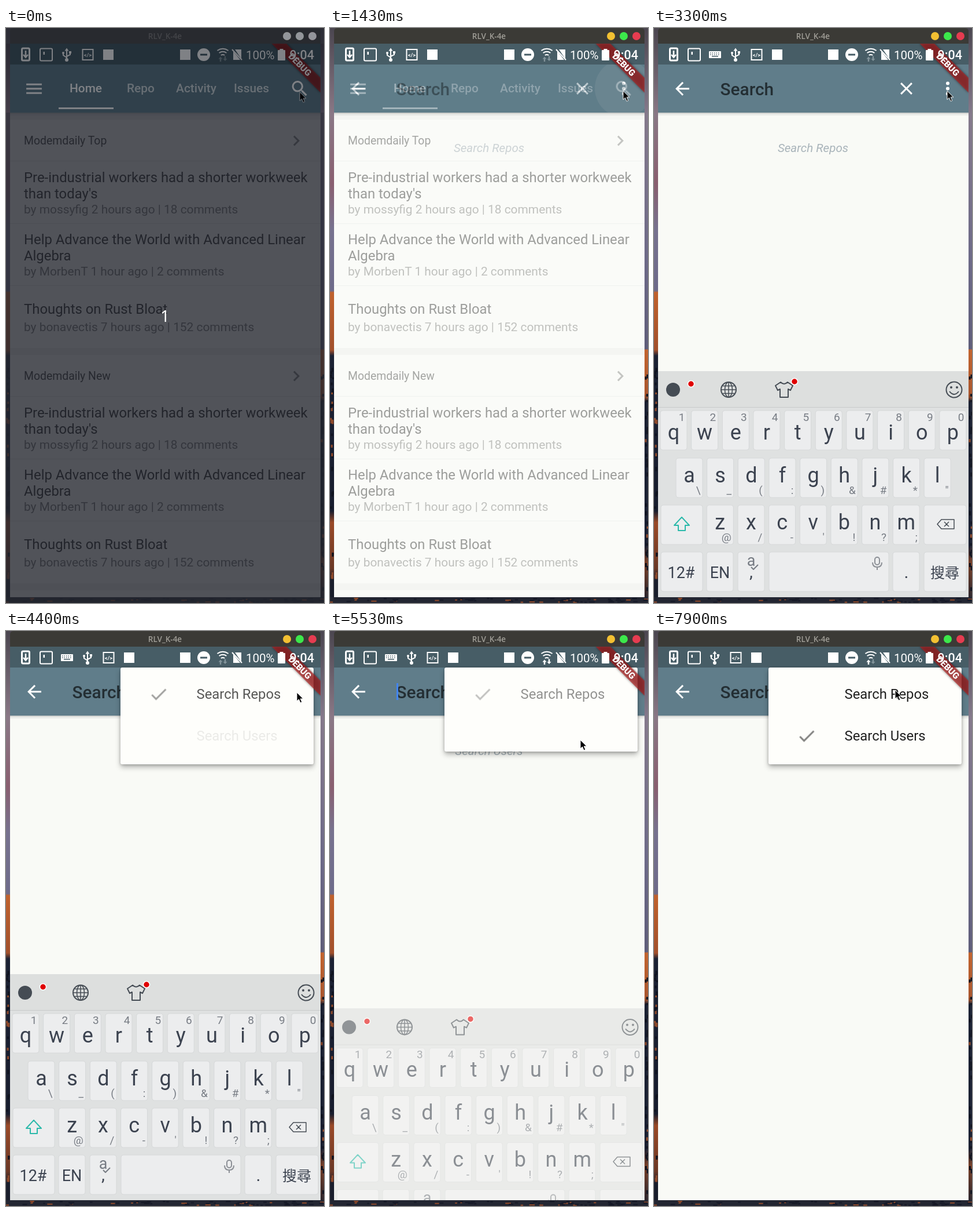
An HTML page for the animation above (8 s loop, 550x992 px).

```html
<!DOCTYPE html>
<html lang="en">
<head>
<meta charset="utf-8">
<title>App search</title>
<style>
html, body { margin: 0; width: 100%; height: 100%; overflow: hidden; background: #14182a; }
#stage { position: relative; width: 550px; height: 992px; overflow: hidden; }
#stage > svg { position: absolute; left: 0; top: 0; }
svg { display: block; font-family: Roboto, sans-serif; }
.title { font-size: 23.87px; fill: rgba(0,0,0,.87); }
.sub { font-size: 20.88px; fill: rgba(0,0,0,.54); }
.head { font-size: 19.4px; fill: rgba(0,0,0,.8); }
.tab { font-size: 20.88px; font-weight: 500; fill: #fff; text-anchor: middle; }
.hint { font-size: 20.6px; font-style: italic; fill: #a9b4ba; text-anchor: middle; }
.key { fill: #ecedee; stroke: #d6d8d9; }
.letter { font-size: 36px; fill: #3c4350; text-anchor: middle; }
.alt { font-size: 19px; fill: #777c84; text-anchor: end; }
.word { font-size: 27px; fill: #3c4350; text-anchor: middle; }
.line { fill: none; stroke: #454c54; stroke-width: 2; stroke-linejoin: round; }
.white { fill: none; stroke: #fff; stroke-width: 2; }
#menu { position: absolute; right: 18px; top: 63px; overflow: hidden; border-radius: 3px;
  background: #fefefb; box-shadow: 0 5px 10px rgba(0,0,0,.28), 0 1px 5px rgba(0,0,0,.2); }
#menu svg { position: absolute; right: 0; top: 0; }
</style>
</head>
<body>
<div id="stage">
  <svg id="base" width="550" height="992"></svg>
  <div id="menu"><svg id="items" width="334" height="167"></svg></div>
  <svg id="top" width="550" height="992"></svg>
</div>
<script>
const $ = id => document.getElementById(id);
const text = (x, y, cls, str, more = '') => `<text x="${x}" y="${y}" class="${cls}" ${more}>${str}</text>`;
const rect = (x, y, w, h, fill, more = '') =>
  `<rect x="${x}" y="${y}" width="${w}" height="${h}" fill="${fill}" ${more}/>`;
const dot = (x, y, r, fill, more = '') => `<circle cx="${x}" cy="${y}" r="${r}" fill="${fill}" ${more}/>`;
const path = (d, cls, more = '') => `<path d="${d}" class="${cls}" ${more}/>`;
const group = (id, inner, more = '') => `<g id="${id}" ${more}>${inner}</g>`;

// Material icons on a 24 unit grid, placed by their centre
const SCALE = 537 / 360;
const shapes = {
  menu: 'M3 18h18v-2H3v2zm0-5h18v-2H3v2zm0-7v2h18V6H3z',
  search: 'M15.5 14h-.79l-.28-.27A6.47 6.47 0 0 0 16 9.5 6.5 6.5 0 1 0 9.5 16c1.61 0 3.09-.59 4.23-1.57l.27.28v.79l5 4.99L20.49 19zm-6 0a4.5 4.5 0 1 1 0-9 4.5 4.5 0 0 1 0 9z',
  back: 'M20 11H7.83l5.59-5.59L12 4l-8 8 8 8 1.41-1.41L7.83 13H20z',
  close: 'M19 6.41L17.59 5 12 10.59 6.41 5 5 6.41 10.59 12 5 17.59 6.41 19 12 13.41 17.59 19 19 17.59 13.41 12z',
  check: 'M9 16.17L4.83 12l-1.42 1.41L9 19 21 7l-1.41-1.41z',
  chevron: 'M10 6L8.59 7.41 13.17 12l-4.58 4.59L10 18l6-6z'
};
const icon = (name, x, y, fill = '#fff') =>
  `<path d="${shapes[name]}" fill="${fill}" transform="translate(${x} ${y}) scale(${SCALE}) translate(-12 -12)"/>`;

const gradient = (id, stops) => `<linearGradient id="${id}" x2="0" y2="1">` +
  stops.map(([at, c]) => `<stop offset="${at}" stop-color="${c}"/>`).join('') + '</linearGradient>';

function wallpaper() {
  let seed = 7;
  const rnd = () => (seed = seed * 16807 % 2147483647) / 2147483647;
  let out = '<defs>' +
    gradient('left', [[0, '#4b4650'], [.15, '#8a7886'], [.27, '#8a5f70'], [.35, '#77728f'], [.457, '#6e6b8a'],
      [.46, '#c0622e'], [.56, '#a2502c'], [.57, '#1c2234'], [.84, '#181d2e'], [.86, '#9a4a28'], [.94, '#6b3826'], [.96, '#1a1e2c']]) +
    gradient('right', [[0, '#4b4650'], [.15, '#857a8c'], [.4, '#6d6a88'], [.558, '#5f5d7a'],
      [.56, '#c2642f'], [.64, '#a8552e'], [.65, '#1b2133'], [.9, '#1b2133'], [.93, '#7a4028'], [1, '#20222e']]) +
    '</defs>' + rect(0, 0, 275, 992, 'url(#left)') + rect(275, 0, 275, 992, 'url(#right)') +
    rect(0, 982, 550, 10, '#232632');
  for (let i = 0; i < 70; i++)
    out += rect(rnd() * 545, 983 + rnd() * 7, 3 + rnd() * 7, 2, rnd() < .3 ? '#8f4a2b' : '#151826');
  for (let i = 0; i < 60; i++)
    out += rect(i % 2 ? 544 + rnd() * 4 : rnd() * 4, 580 + rnd() * 400, 3, 3 + rnd() * 5, rnd() < .25 ? '#8f4a2b' : '#10131f');
  return out;
}

const bar = rect(7, 63, 537, 83, '#607d8a');
const barShadow = rect(7, 146, 537, 2, '#000', 'opacity=".16"') + rect(7, 148, 537, 3, '#000', 'opacity=".05"');

function section(y, name) {
  const t = (dy, s) => text(31, y + dy, 'title', s);
  const s = (dy, str) => text(31, y + dy, 'sub', str);
  return rect(7, y, 537, 394, '#fcfdf9') +
    [71, 179, 286].map(dy => rect(7, y + dy, 537, 1, '#e6e7e4')).join('') +
    text(31, y + 43, 'head', name) + icon('chevron', 502, y + 36.5, 'rgba(0,0,0,.5)') +
    t(108, 'Pre-industrial workers had a shorter workweek') + t(136, "than today's") +
    s(162, 'by mossyfig 2 hours ago | 18 comments') +
    t(215, 'Help Advance the World with Advanced Linear') + t(243, 'Algebra') +
    s(269, 'by MorbenT 1 hour ago | 2 comments') +
    t(335, 'Thoughts on Rust Bloat') + s(365, 'by bonavectis 7 hours ago | 152 comments');
}

function home() {
  return rect(7, 146, 537, 836, '#eeefec') + section(158, 'Modemdaily Top') + section(564, 'Modemdaily New') +
    rect(7, 970, 537, 12, '#fcfdf9') + barShadow + bar +
    dot(508, 104, 50, '#ccc', 'id="ripple" fill-opacity=".25" clip-path="url(#barClip)"') +
    icon('menu', 48.5, 104.8) + text(138, 111, 'tab', 'Home') +
    ['Repo', 'Activity', 'Issues'].map((s, i) => text([233, 329, 424.5][i], 111, 'tab', s, 'opacity=".7"')).join('') +
    rect(91, 137, 95, 3, '#fff') + icon('search', 508, 104.5);
}

function searchPage() {
  return rect(7, 146, 537, 836, '#f9faf6') + barShadow + bar + icon('back', 49, 104.8) +
    text(114.5, 116, '', 'Search', 'font-size="29.83" font-weight="500" fill="rgba(0,0,0,.63)"') +
    rect(115, 90, 3, 29, '#4285f4', 'id="caret"') + icon('close', 436.5, 104.5) +
    [-9, 0, 9].map(d => dot(508, 104.5 + d, 3, '#fff')).join('') +
    text(275, 213.5, 'hint', 'Search Repos', 'id="hintRepos"') +
    text(275, 213.5, 'hint', 'Search Users', 'id="hintUsers"');
}

function keyboard() {
  const key = (x, y, w = 46) => rect(x, y, w, 68, '', 'rx="4" class="key"');
  const row = (chars, alts, cx, y, base, altBase) => [...chars].map((c, i) => {
    const x = cx + i * 53.65;
    return key(x - 23, y) + text(x, base, 'letter', c) + text(x + 19.5, altBase, 'alt', alts[i]);
  }).join('');
  const shirt = 'M219 611l-9 6 4 8 4-2v14h14v-14l4 2 4-8-9-6q-6 6-12 0z';
  return rect(7, 592, 537, 390, '#dfe1e1') + rect(7, 592, 537, 62, '#dddfde') + rect(7, 654, 537, 1, '#c8cacb') +
    dot(33, 624, 12, '#454c54') +
    dot(64, 614, 5.5, '#e00000', 'stroke="#fff" stroke-width="1.5"') +
    path('M116 624h26M129 611v26M118.500 617.500h21M118.500 630.500h21', 'line', 'style="stroke-width:1.5"') +
    dot(129, 624, 13, 'none', 'class="line"') +
    '<ellipse cx="129" cy="624" rx="6.5" ry="13" class="line" style="stroke-width:1.5"/>' +
    path(shirt, 'line') + dot(243, 610, 5.5, '#e00000', 'stroke="#fff" stroke-width="1.5"') +
    dot(519, 624, 13.5, 'none', 'class="line"') + dot(514, 620, 2, '#454c54') + dot(524, 620, 2, '#454c54') +
    path('M511 627q8 10 16 0', 'line') +
    row('qwertyuiop', '1234567890', 34, 660, 710, 678) +
    row('asdfghjkl', '\\_(:)&#*"', 61, 742, 784, 804) +
    row('zxcvbnm', "@/-'!?;", 114.3, 823, 865, 885) +
    key(12, 823, 72) + path('M48 844l13 14h-7v9h-12v-9h-7z', 'line', 'style="stroke:#2bb9aa"') +
    key(467, 823, 73) + path('M490 856l7-8h22v16h-22zM502 852l8 8M510 852l-8 8', 'line', 'style="stroke-width:1.5"') +
    key(12, 904, 72) + text(47, 949, 'word', '12#') +
    key(91, 904) + text(114, 949, 'word', 'EN') +
    key(145, 904) + text(168, 928, 'word', 'a', 'style="fill:#777c84"') +
    path('M168 930l4 4 8-8', 'line', 'style="stroke:#777c84"') + text(168, 948, 'letter', ',', 'style="font-size:30px"') +
    key(199, 904, 207) + rect(382, 913, 8, 13, 'none', 'rx="4" stroke="#8c9096" stroke-width="2"') +
    path('M378 922q0 8 8 8t8-8M386 930v5', 'line', 'style="stroke:#8c9096"') +
    key(413, 904) + text(436.5, 949, 'letter', '.', 'style="font-size:30px"') +
    key(467, 904, 73) + text(503, 949, 'word', '搜尋',
      `style="font-size:25px;font-family:'Noto Sans CJK TC','Noto Sans CJK',sans-serif"`);
}

function statusIcons() {
  const usb = path('M105 36v19M99 43v4l6 4M111 42v4l-6 3', 'white') + dot(105, 55, 3, '#fff') +
    path('M101.500 39.500l3.500-5 3.500 5z', '', 'fill="#fff"') + dot(99, 43, 2, '#fff') + rect(109, 40, 4, 4, '#fff');
  const code = rect(132.5, 37, 18, 18, 'none', 'class="white"') +
    text(141.500, 49.500, '', '&lt;/&gt;', 'font-size="9.500" font-weight="700" fill="#fff" text-anchor="middle"');
  const keys = rect(95, 40, 21, 12, '#fff', 'rx="1"') +
    path('M97 43h17M97 46h17', '', 'stroke="#475d66" stroke-width="1.5" stroke-dasharray="1.5 2"') + rect(100, 48, 11, 1.5, '#475d66');
  const wifi = [4, 8, 12].map(r => path(`M${375 - r * .8} ${51 - r}q${r * .8} ${-r * .55} ${r * 1.6} 0`, 'white')).join('');
  const up = 'M367.500 53.500l3.500-4 3.500 4h-2.300v4.500h-2.400v-4.500z', down = 'M375.500 53l3.500 4 3.500-4h-2.300v-4.500h-2.400v4.500z';
  return rect(27.5, 35, 13, 21, 'none', 'rx="2" stroke="#fff" stroke-width="3"') +
    path('M34 39v10M30 46l4 4.500 4-4.500', 'white', 'style="stroke-width:2.500"') +
    rect(59, 35.500, 21, 21, 'none', 'rx="2" class="white"') + rect(64.500, 41, 2.500, 5, '#fff') +
    group('imeIcon', keys) + group('notes', usb + code + rect(168, 37, 18, 18, '#fff')) +
    rect(301, 37, 18, 18, '#fff') + dot(342, 46, 11, '#fff') + rect(336, 44.500, 12, 3, '#475d66') +
    wifi + path(up + down, '', 'fill="#83949b"') + path(up, '', 'id="up" fill="#fff"') + path(down, '', 'id="down" fill="#fff"') +
    path('M396 37h11v16zM393 40l12 15h-12z', '', 'fill="#fff"') + path('M391 37l17 18', 'white') +
    text(415, 53.500, '', '100%', 'font-size="20.500" fill="#fff"') +
    rect(470, 38, 13, 18, '#fff', 'rx="1"') + rect(473.500, 36, 6, 3, '#fff') +
    text(490.500, 53.500, '', '9:04', 'font-size="21.500" font-weight="500" fill="#fff"');
}

const ribbon = 'M459.600 27H485L544 86V111.400Z';
const banner = `<g clip-path="url(#appClip)">${path(ribbon, '', 'opacity=".5" filter="url(#soft)"')}` +
  path(ribbon, '', 'fill="#b71c1c" fill-opacity=".627"') +
  text(0, 5.500, '', 'DEBUG', 'transform="translate(508.500 63) rotate(45)" font-size="15.200" font-weight="900" fill="#fff" text-anchor="middle"') + '</g>';

const countdown = rect(0, 0, 550, 27, '#23262e', 'opacity=".75"') + rect(0, 146, 550, 846, '#23262e', 'opacity=".79"') +
  rect(0, 27, 550, 119, '#00050c', 'opacity=".5"') +
  [486, 508, 530].map(x => dot(x, 14, 7, '#93959a')).join('') +
  text(275, 507, '', '1', `font-size="28" fill="#fff" text-anchor="middle" style="font-family:'Noto Sans',sans-serif"`);

$('base').innerHTML = `<defs><clipPath id="appClip">${rect(7, 27, 537, 955)}</clipPath>` +
  `<clipPath id="barClip">${rect(7, 63, 537, 83)}</clipPath></defs>` + wallpaper() +
  path('M7 27V6q0-6 6-6H538q6 0 6 6V27Z', '', 'fill="#3b3a36"') +
  text(275, 19, '', 'RLV_K-4e', `font-size="13.500" font-weight="600" fill="#a09e97" text-anchor="middle" style="font-family:'Open Sans',sans-serif"`) +
  ['#f3c032', '#3ce84b', '#e63c50'].map((c, i) => dot(486 + i * 22, 14, 7, c)).join('') +
  rect(7, 27, 537, 36, '#475d66') + home() + group('search', searchPage());

$('items').innerHTML =
  group('item0', text(131.500, 54, 'title', 'Search Repos') + group('check0', icon('check', 66, 46, 'rgba(0,0,0,.5)'))) +
  group('item1', text(131.500, 126, 'title', 'Search Users') + group('check1', icon('check', 66, 118, 'rgba(0,0,0,.5)')));

$('top').innerHTML = '<defs><filter id="soft" x="-20%" y="-20%" width="140%" height="140%"><feGaussianBlur stdDeviation="2"/></filter></defs>' +
  `<g clip-path="url(#appClip)">${group('ime', keyboard())}</g>` + banner + statusIcons() +
  group('pointer', path('M0 0V15l3.500-3.200 2.600 6 2.700-1.200-2.600-5.700H11Z', '', 'fill="#000" stroke="#fff" stroke-width="1"')) +
  group('countdown', countdown);

// Keyframes given as [ms, value] on the 8 s loop
const LOOP = 8000;
function track(id, prop, points, easing = 'linear') {
  const all = [[0, points[0][1]], ...points, [LOOP, points[points.length - 1][1]]];
  $(id).animate(all.map(([ms, v]) => ({ offset: ms / LOOP, [prop]: v, easing })),
    { duration: LOOP, iterations: Infinity });
}
const toggle = (id, start, ...times) =>
  track(id, 'opacity', [[0, start], ...times.map((ms, i) => [ms, i % 2 ? start : 1 - start])], 'step-end');

toggle('countdown', 1, 30);

track('ripple', 'r', [[430, '0px'], [1400, '50px']], 'ease-out');
track('ripple', 'opacity', [[430, 0], [500, 1], [1430, 1], [1600, 0]]);
track('search', 'opacity', [[1316, 0], [1616, 1]], 'cubic-bezier(.4,0,.2,1)');

toggle('caret', 0, 1700, 2200, 2700, 3200, 3700, 4200, 5430, 5930, 6430, 6930);
toggle('hintRepos', 1, 5330);
toggle('hintUsers', 0, 5330);
toggle('check0', 1, 5640);
toggle('check1', 0, 5640);

// The menu opens over 300 ms in overlapping parts and folds back in 200 ms
const OPEN = [4218, 7230], CLOSE = 5430, UNIT = 2 / 7;
function unfold(id, prop, from, to, value) {
  const rise = start => [[start + 300 * from, value(0)], [start + 300 * to, value(1)]];
  track(id, prop, [...rise(OPEN[0]),
    [CLOSE + 200 * (1 - to), value(1)], [CLOSE + 200 * (1 - from), value(0)], ...rise(OPEN[1])]);
}
unfold('menu', 'width', 0, UNIT, k => 334 * k + 'px');
unfold('menu', 'height', 0, UNIT * 2, k => 167 * k + 'px');
unfold('menu', 'opacity', 0, 1 / 3, k => k);
unfold('item0', 'opacity', UNIT, UNIT * 2.5, k => k);
unfold('item1', 'opacity', UNIT * 2, 1, k => k);

// Soft keyboard: show, hide, show, hide
const SHOW = [1720, 5460], HIDE = [4450, 7400];
const slide = [], fade = [];
SHOW.forEach((s, i) => {
  const h = HIDE[i];
  [[s, 90, 0], [s + 70, 60, .58], [s + 140, 22, .95], [s + 250, 0, 1], [h, 0, 1], [h + 90, 30, .5], [h + 170, 80, 0]]
    .forEach(([ms, y, a]) => { slide.push([ms, `translateY(${y}px)`]); fade.push([ms, a]); });
});
track('ime', 'transform', slide);
track('ime', 'opacity', fade);
const imeTimes = [1720, 4480, 5450, 7430];
toggle('imeIcon', 0, ...imeTimes);
track('notes', 'transform', [[0, 'translateX(0px)'],
  ...imeTimes.map((ms, i) => [ms, `translateX(${i % 2 ? 0 : 36}px)`])], 'step-end');
toggle('up', 0, 5400, 5800, 7600);
toggle('down', 0, 5400, 5800);

track('pointer', 'transform', [
  [0, 508, 110.500], [199, 508, 110.500], [200, 507, 108.500], [4080, 507, 108.500], [4200, 503, 106],
  [4800, 503, 106], [5150, 433, 188], [5560, 433, 188], [5980, 309, 217],
  [6800, 309, 217], [7130, 503, 107], [7600, 503, 107], [7880, 417, 102]
].map(([ms, x, y]) => [ms, `translate(${x}px, ${y}px)`]));
</script>
</body>
</html>
```
